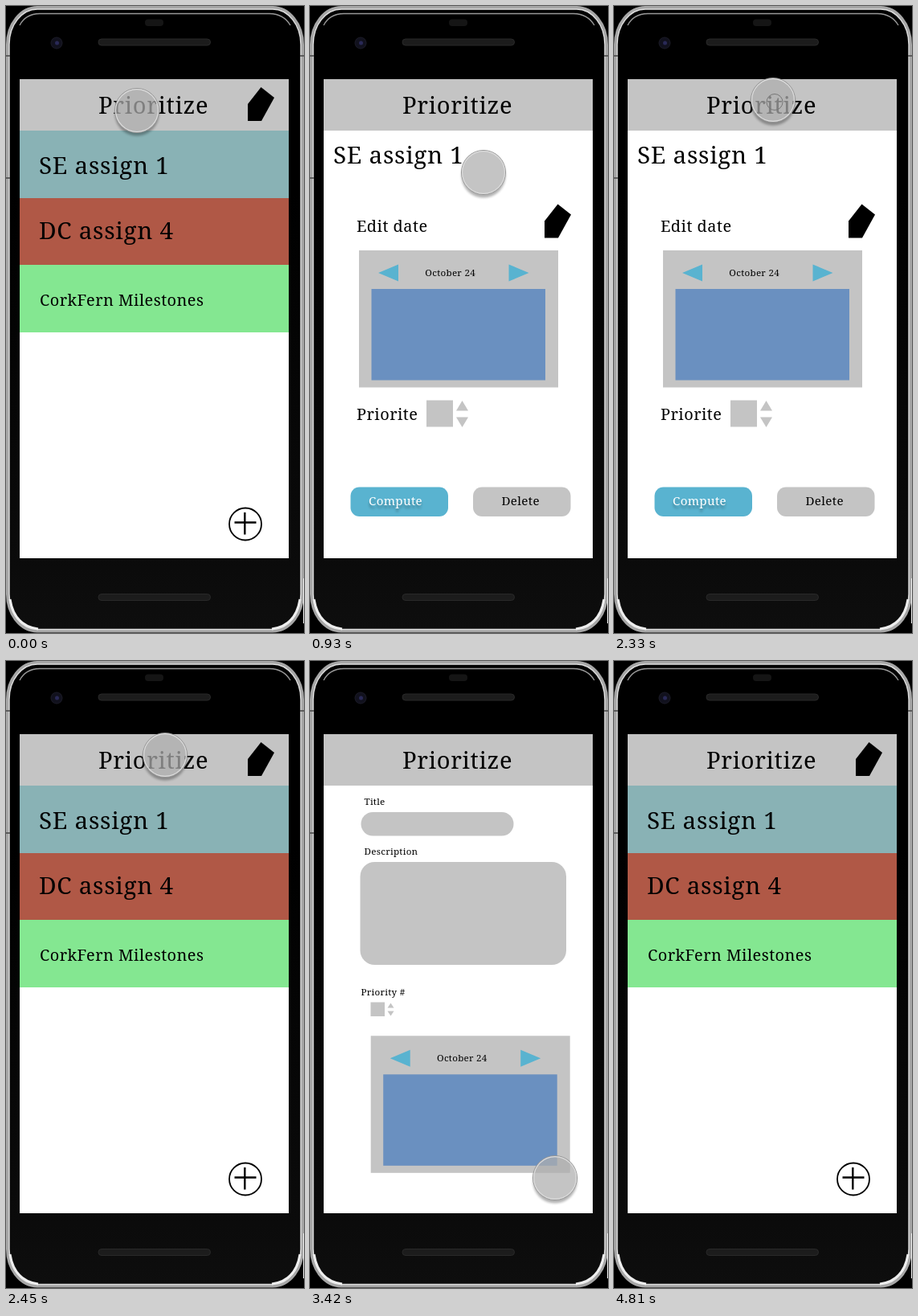
Recreate the animation shown at these times as an HTML page. Size 371 by 780 pixels, loop 5.9 s.

```html
<!DOCTYPE html>
<html lang="en">
<head>
<meta charset="utf-8">
<title>Prioritize</title>
<style>
  html, body { margin: 0; width: 100%; height: 100%; overflow: hidden; background: #000; }
  svg { display: block; width: 371px; height: 780px; }
  text { font-family: "Noto Serif", serif; font-size: 11.6px; letter-spacing: .024em; }
  .heading { font-size: 29.1px; }
  .task { font-size: 29.7px; }
  .label { font-size: 19.9px; }
  .button { font-size: 15.1px; }
  .grey { fill: #c4c4c4; }
  .accent { fill: #59b3d0; }
</style>
</head>
<body>
<svg viewBox="0 0 371 780">
  <defs>
    <linearGradient id="glass" x2="0" y2="1">
      <stop offset=".3" stop-color="#000"/>
      <stop offset=".9" stop-color="#0b0b0b"/>
      <stop offset="1" stop-color="#0e0e0e"/>
    </linearGradient>
    <filter id="blur" x="-20%" y="-20%" width="140%" height="150%">
      <feGaussianBlur stdDeviation="1.5"/>
    </filter>
    <mask id="outside" maskUnits="userSpaceOnUse" x="-40" y="-40" width="80" height="80">
      <rect x="-40" y="-40" width="80" height="80" fill="#fff"/>
      <circle r="27.5"/>
    </mask>
    <path id="pencil" d="M317.5 101 334 114 318 143H301V122Z"/>
    <g id="calendar">
      <rect class="grey" x="61" y="304" width="248" height="170.5"/>
      <rect x="76.5" y="352" width="216.5" height="113.5" fill="#6a90c0"/>
      <path class="accent" d="M85 332 110 321.5V342.5ZM272.5 332 247.5 321.5V342.5Z"/>
      <text x="143.3" y="336">October 24</text>
    </g>
  </defs>

  <g id="phone">
    <rect width="371" height="780"/>
    <rect x="2" y="2" width="367" height="775.5" rx="37" ry="46" fill="url(#glass)" stroke="#a6a6a6" stroke-width="4"/>
    <rect x="4" y="4" width="363" height="771.5" rx="35" ry="44" fill="none" stroke="#dedede" stroke-width="1.4"/>
    <path d="M17 24Q24 10 42 9.5H328Q346 10 354 24" fill="none" stroke="#999" stroke-width="1.3"/>
    <path d="M5 738Q10 771 40 775M366 738Q361 771 331 775" fill="none" stroke="#eee" stroke-width="3"/>
    <path d="M0 62H5M366 62H371M0 214H5" stroke="#444" stroke-width="1.5"/>
    <path d="M370.5 712V768" stroke="#eee"/>
    <g fill="#1c1c1c" stroke="#292929">
      <rect x="115" y="41" width="139.5" height="8" rx="4"/>
      <rect x="115" y="731.5" width="139.5" height="8" rx="4"/>
    </g>
    <rect x="173" y="16.5" width="23" height="8.5" rx="4" fill="#151515"/>
    <circle cx="63" cy="46" r="7" fill="#11111d" stroke="#1c1c28"/>
    <circle cx="63.5" cy="46" r="2.5" fill="#292956"/>
  </g>

  <path d="M17 91H352V687H17Z" fill="#fff"/>
  <path class="grey" d="M17 91H352V155H17Z"/>
  <text class="heading" x="115" y="134">Prioritize</text>

  <g class="screen" id="list">
    <use href="#pencil"/>
    <path d="M17 155H352V239H17Z" fill="#89b2b5"/>
    <path d="M17 239H352V322H17Z" fill="#b05846"/>
    <path d="M17 322H352V406H17Z" fill="#84e791"/>
    <text class="task" x="41" y="208.5">SE assign 1</text>
    <text class="task" x="41" y="289.5">DC assign 4</text>
    <text class="label" x="42" y="373">CorkFern Milestones</text>
    <g fill="none" stroke="#000">
      <circle cx="298" cy="644.5" r="20" stroke-width="1.8"/>
      <path d="M284.5 642.5H311.5M297.3 630V657.5" stroke-width="2.4"/>
    </g>
  </g>

  <g class="screen" id="detail">
    <text class="task" x="29" y="195.5">SE assign 1</text>
    <use href="#pencil" x="-9" y="145.5"/>
    <text class="label" x="58" y="281">Edit date</text>
    <use href="#calendar"/>
    <text class="label" x="58" y="514.5">Priorite</text>
    <path class="grey" d="M145 490.5H178V523.5H145ZM182 503.5 189.5 491 197 503.5ZM182 511.5H197L189.5 524Z"/>
    <rect class="accent" x="50.5" y="598.5" width="121.5" height="36.5" rx="11"/>
    <rect class="grey" x="203" y="598.5" width="121.5" height="36.5" rx="11"/>
    <text class="button" x="73" y="625" opacity=".3" filter="url(#blur)">Compute</text>
    <text class="button" x="73" y="621" fill="#fff">Compute</text>
    <text class="button" x="238.5" y="621">Delete</text>
  </g>

  <g class="screen" id="form">
    <text x="67.5" y="179">Title</text>
    <rect class="grey" x="63.5" y="188" width="190" height="29.5" rx="14.75"/>
    <text x="67.5" y="241">Description</text>
    <rect class="grey" x="62.5" y="250" width="256.5" height="128" rx="18"/>
    <text x="63.5" y="416">Priority #</text>
    <path class="grey" d="M75.5 424.5H93V442H75.5ZM96.5 431.5 100.5 425.5 104.5 431.5ZM96.5 435.5H104.5L100.5 441.5Z"/>
    <use href="#calendar" x="14.7" y="162.3"/>
  </g>

  <g id="pointer">
    <circle cy="4" r="27.5" opacity=".3" filter="url(#blur)" mask="url(#outside)"/>
    <circle r="27.5" fill="#afafaf" fill-opacity=".73" stroke="#959595"/>
    <circle r="26.4" fill="none" stroke="#ddd" stroke-width="1.2"/>
    <circle id="ring" cx="2" cy="2.5" r="10" fill="none" stroke="#777"/>
  </g>
</svg>

<script>
  const LOOP = 5900;
  const STEP = 138;      // the pointer is redrawn about seven times a second
  const PRESS = 125;     // the ring shows this long before a screen opens
  const POINTER_END = 4810;

  const visits = [
    { from: 0, id: "list" },
    { from: 930, id: "detail" },
    { from: 2450, id: "list" },
    { from: 3420, id: "form" },
    { from: 4660, id: "list" }
  ];

  // ease is a power: above 1 slows down, below 1 speeds up
  const home = { x: 163, y: 130 };
  const moves = [
    { start: 255, span: 2 * STEP, x: 220, y: 238, ease: .45 },
    { start: 531, span: 350, x: 216, y: 207, ease: 3 },
    { start: 1490, span: 3 * STEP, x: 212, y: 588, ease: 1.5 },
    { start: 1910, span: 345, x: 198, y: 117, ease: 3 },
    { start: 2695, span: 2 * STEP, x: 313, y: 708, ease: .45 },
    { start: 2971, span: 280, x: 305, y: 643, ease: 3 },
    { start: 3820, span: 480, x: 161, y: 113, ease: 3 }
  ];

  const pointer = document.getElementById("pointer");
  const ring = document.getElementById("ring");
  const screens = document.querySelectorAll(".screen");
  const show = (node, visible) => { node.style.display = visible ? "" : "none"; };
  const mix = (a, b, t) => a + (b - a) * t;

  function pointerAt(time) {
    const index = moves.findLastIndex(move => move.start <= time);
    if (index < 0) return home;
    const origin = moves[index - 1] || home;
    const { start, span, x, y, ease } = moves[index];
    const elapsed = (Math.floor((time - start) / STEP) + 1) * STEP;
    const progress = 1 - (1 - Math.min(1, elapsed / span)) ** ease;
    return { x: mix(origin.x, x, progress), y: mix(origin.y, y, progress) };
  }

  function draw(time) {
    const { id } = visits.findLast(visit => visit.from <= time);
    const { x, y } = pointerAt(time);
    screens.forEach(screen => show(screen, screen.id === id));
    show(pointer, time < POINTER_END);
    show(ring, visits.some(({ from }) => time < from && time >= from - PRESS));
    pointer.setAttribute("transform", `translate(${x} ${y})`);
  }

  const start = performance.now();
  function tick() {
    draw((performance.now() - start) % LOOP);
    requestAnimationFrame(tick);
  }
  tick();
</script>
</body>
</html>
```
